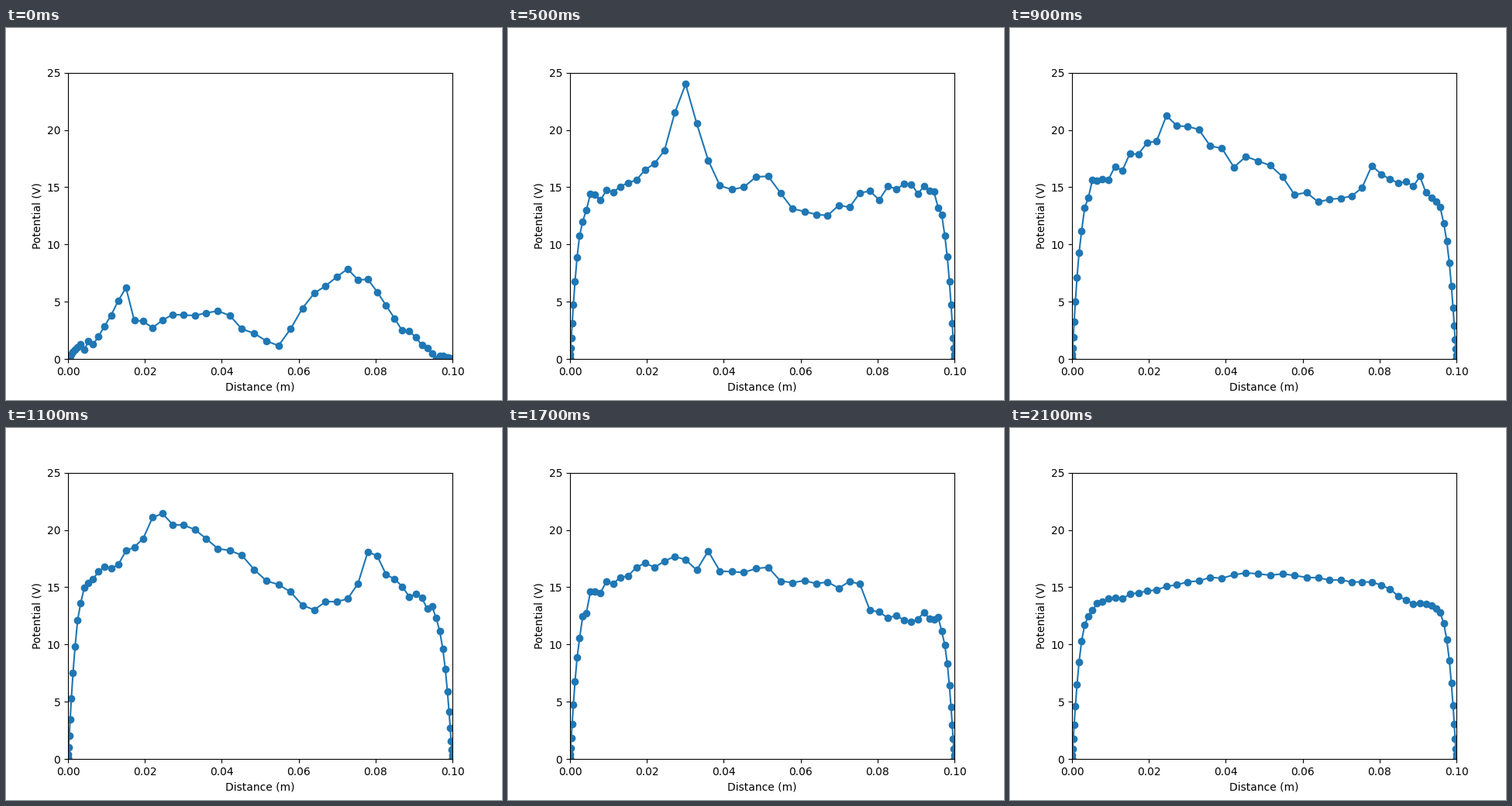
These frames come from a looping animation (640 px wide and 480 px high, 2.2 s). A matplotlib script:

```python
import numpy as np
import matplotlib.pyplot as plt
from matplotlib.animation import FuncAnimation

FRAMES, STEP_MS = 22, 100
NODES = 64
LENGTH = 0.1        # m
SHEATH = 0.0024     # wall layer thickness, m
CREST = 24.0        # height of the recurring burst, V

# Grid packed towards both walls
u = np.arange(NODES) / (NODES - 1)
x = LENGTH * (u - np.sin(2 * np.pi * u) / (2 * np.pi))
wall = np.tanh(np.minimum(x, x[::-1]) / SHEATH)

# Bends of the plateau at key steps: (distance in mm, potential in V)
SHAPES = {
    0: [(0, 1.2), (7, 1.8), (15, 5.9), (18, 2.6), (38, 4.6),
        (55, 0.9), (64, 6), (75, 7.6), (92, 0.5), (100, 0.2)],
    3: [(0, 13.7), (22, 14.8), (27, 12.6), (45, 13.6), (61, 11),
        (85, 15), (100, 13.4)],
    7: [(0, 13.2), (30, 20.2), (42, 16.2), (51, 19.8), (57, 15.7),
        (68, 14), (92, 16.2), (100, 13.4)],
    11: [(0, 15), (13, 17), (24, 21.8), (36, 19.7), (64, 12.8),
         (75, 14.7), (78, 18), (100, 11.6)],
    14: [(0, 12.2), (30, 20.8), (39, 19.7), (51, 22.7), (58, 16.6),
         (67, 16), (78, 11), (100, 12.4)],
    17: [(0, 13.4), (25, 17.6), (42, 17.2), (55, 15.6), (75, 15.3),
         (82, 12.2), (100, 13)],
    21: [(0, 13), (25, 15.1), (47, 16.3), (80, 15.3), (88, 13.7),
         (100, 13.3)],
}


def plateau(bends):
    mm, volts = zip(*bends)
    return np.interp(x * 1000, mm, volts)


keys = list(SHAPES)
plateaus = np.array([plateau(bends) for bends in SHAPES.values()])


def potential(k):
    level = np.array([np.interp(k, keys, column) for column in plateaus.T])
    # Noise vanishes at the walls and calms down at the end
    rough = 0.1 + 0.3 * min(1, (FRAMES - 1 - k) / 3)
    noise = np.random.default_rng(k).normal(0, rough, NODES)
    y = np.maximum(0, wall * level + wall ** 6 * noise)
    if k and k % 5 == 0:
        top = y.argmax()
        y += (CREST - y[top]) * np.exp(-((x - x[top]) / 0.005) ** 2)
    return y


fig, ax = plt.subplots(figsize=(6.4, 4.8), dpi=100)
line, = ax.plot(x, potential(0), "o-", color="tab:blue")
ax.set(xlim=(0, LENGTH), ylim=(0, 25),
       xlabel="Distance (m)", ylabel="Potential (V)")


def draw(k):
    line.set_ydata(potential(k))
    return line,


anim = FuncAnimation(fig, draw, frames=FRAMES, interval=STEP_MS, repeat=True)
plt.show()
```
